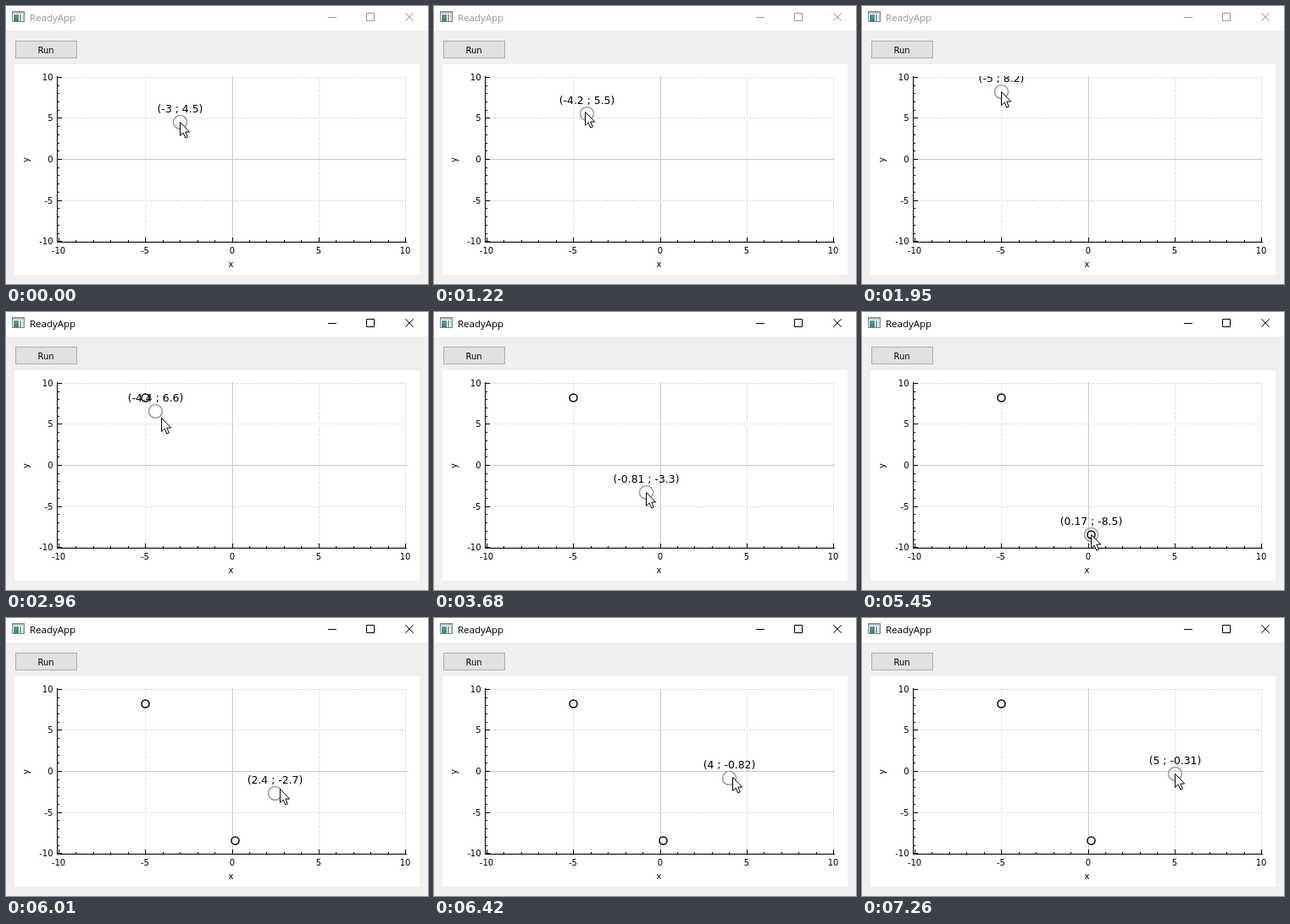
Write an HTML page that moves like this. It is 498 px wide and 329 px high and loops after 8 s.

```html
<!DOCTYPE html>
<html lang="en">
<head>
<meta charset="utf-8">
<title>ReadyApp</title>
<style>
  html, body { margin: 0; width: 100%; height: 100%; overflow: hidden; background: #f0f0f0; }
  svg { display: block; width: 498px; height: 329px; }
  text { font: 10px "DejaVu Sans", Tahoma, sans-serif; fill: #000; }
  #title { font: 11.5px "Open Sans", "Segoe UI", sans-serif; }
  #label { font-size: 12.4px; text-anchor: middle; }
  .crisp { shape-rendering: crispEdges; }
  .mid { text-anchor: middle; }
  .end { text-anchor: end; }
</style>
</head>
<body>
<svg viewBox="0 0 498 329">
  <defs>
    <clipPath id="area"><rect x="60" y="83" width="413" height="197"/></clipPath>
    <linearGradient id="teal" x2="0" y2="1">
      <stop offset="0" stop-color="#5f9ea0"/><stop offset="1" stop-color="#3f7f78"/>
    </linearGradient>
  </defs>
  <rect width="498" height="329" fill="#f0f0f0"/>
  <rect width="498" height="29" fill="#fff"/>

  <g class="crisp">
    <rect x="7.5" y="6.5" width="14" height="12" fill="#fff" stroke="#7a8488"/>
    <rect x="8" y="7" width="13" height="2" fill="#b4bcc0"/>
    <rect x="9" y="10" width="6" height="8" fill="url(#teal)"/>
    <rect x="16" y="10" width="2" height="8" fill="#8fa3a6"/>
    <rect x="19" y="10" width="2" height="8" fill="#cfd6d8"/>
  </g>
  <text id="title" x="28" y="18">ReadyApp</text>
  <g id="controls" fill="none">
    <path d="M380 13.5h10M425.5 8.5h9v9h-9z"/>
    <path d="M471.3 8.3l9.4 9.4M480.7 8.3l-9.4 9.4"/>
  </g>

  <rect class="crisp" x="11.5" y="41.5" width="72" height="20" fill="#e1e1e1" stroke="#adadad"/>
  <text class="mid" x="47" y="56">Run</text>

  <rect x="10" y="69" width="478" height="249" fill="#fff"/>
  <path id="grid" class="crisp" fill="none" stroke="#c8c8c8" stroke-dasharray="1 2"/>
  <path id="zero" class="crisp" fill="none" stroke="#c8c8c8"/>
  <path id="axes" class="crisp" fill="none" stroke="#000"/>
  <g id="ticks"></g>
  <text class="mid" x="265.5" y="309">x</text>
  <text class="mid" transform="translate(27 182) rotate(-90)">y</text>

  <g fill="#fff" stroke="#000" stroke-width="1.5">
    <circle id="dotA" r="4.5"/>
    <circle id="dotB" r="4.5"/>
  </g>
  <g clip-path="url(#area)">
    <circle id="ring" r="8" fill="none" stroke="#a0a0a0" stroke-width="1.6"/>
    <text id="label"></text>
  </g>
  <path id="cursor" d="M0 0V16L3.7 12.6L6.3 18.6L8.8 17.5L6.3 11.6H11.2Z" fill="#fff" stroke="#000"/>
</svg>
<script>
const LOOP = 8000;
const ACTIVE_AT = 2380, DOT_B_AT = 5450;
const $ = id => document.getElementById(id);

function set(id, attrs) {
  for (const [name, value] of Object.entries(attrs)) $(id).setAttribute(name, value);
}

// Plot coordinates to pixel centres
const pixelX = v => Math.round(266.5 + 20.45 * v) + 0.5;
const pixelY = v => Math.round(181.05 - 9.72 * v) + 0.5;
const short = v => String(+v.toPrecision(2));

function tick(text, x, y, cls) {
  const el = document.createElementNS("http://www.w3.org/2000/svg", "text");
  el.setAttribute("class", cls);
  el.setAttribute("x", x);
  el.setAttribute("y", y);
  el.textContent = text;
  $("ticks").append(el);
}

function drawPlot() {
  let grid = "", zero = "", axes = "M60.5 83V280M60 279.5H473";
  for (let v = -10; v <= 10; v++) {
    const x = pixelX(v), y = pixelY(v), major = v % 5 === 0;
    const len = major ? 5 : 2;
    axes += `M${x} 279v${-len}M61 ${y}h${len}`;
    if (!major) continue;
    const lines = `M${x} 280V83M60 ${y}H473`;
    if (v) grid += lines; else zero += lines;
    tick(v, x - 0.5, 293, "mid");
    tick(v, 55.5, y + 3.7, "end");
  }
  set("grid", { d: grid });
  set("zero", { d: zero });
  set("axes", { d: axes });
}

const linear = u => u;
const easeIn = p => u => u ** p;
const easeOut = p => u => 1 - (1 - u) ** p;

// The ring is dragged in discrete steps, the first shown at `from`, the last at `to`
const home = [-3, 4.5], spotA = [-5, 8.2], spotB = [0.17, -8.46];
const moves = [
  { from: 780, to: 1950, steps: 9, end: spotA, ex: easeOut(1.6), ey: easeIn(1.6) },
  { from: 2830, to: 3680, steps: 7, end: [-0.81, -3.3] },
  { from: 3950, to: 4110, steps: 2, end: [-0.35, -5.9] },
  { from: 4420, to: 5170, steps: 6, end: spotB, ex: easeOut(1.6), ey: easeOut(1.6) },
  { from: 5730, to: 6830, steps: 9, end: [4.66, -0.6], ex: easeOut(1.745), ey: easeOut(3.25) },
  { from: 7100, to: 7260, steps: 2, end: [5, -0.31] }
];

// Plot position at time t, `lead` steps ahead of the ring
function position(t, lead = 0) {
  let start = home;
  for (const { from, to, steps, end, ex = linear, ey = linear } of moves) {
    if (t < from) break;
    if (t < to) {
      const step = 1 + Math.floor((t - from) / (to - from) * (steps - 1));
      const u = Math.min(1, (step + lead) / steps);
      return [start[0] + (end[0] - start[0]) * ex(u), start[1] + (end[1] - start[1]) * ey(u)];
    }
    start = end;
  }
  return start;
}

function draw(t) {
  const [vx, vy] = position(t), [mx, my] = position(t, 0.5);
  const x = pixelX(vx), y = pixelY(vy);
  set("ring", { cx: x, cy: y });
  set("label", { x, y: y - 11.5 });
  $("label").textContent = `(${short(vx)} ; ${short(vy)})`;
  set("cursor", { transform: `translate(${pixelX(mx)} ${pixelY(my)})` });

  const active = t >= ACTIVE_AT;
  $("title").style.fill = active ? "#000" : "#999";
  set("controls", { stroke: active ? "#000" : "#999" });
  $("dotA").style.display = active ? "" : "none";
  $("dotB").style.display = t >= DOT_B_AT ? "" : "none";
}

drawPlot();
set("dotA", { cx: pixelX(spotA[0]), cy: pixelY(spotA[1]) });
set("dotB", { cx: pixelX(spotB[0]), cy: pixelY(spotB[1]) });
const start = performance.now();
function frame() {
  draw((performance.now() - start) % LOOP);
  requestAnimationFrame(frame);
}
frame();
</script>
</body>
</html>
```
